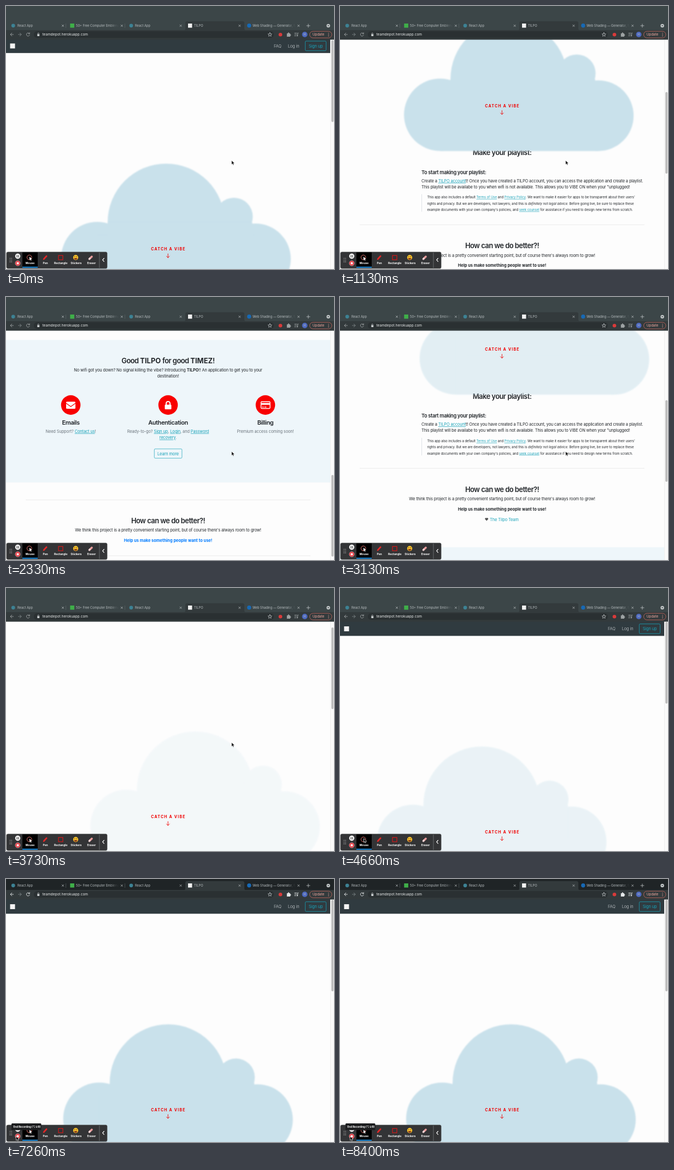
Animation of 600 by 480 pixels, one loop 8.46 s. Source, as an HTML page:

```html
<!DOCTYPE html>
<html lang="en">
<head>
<meta charset="utf-8">
<title>Page scroll</title>
<style>
html, body { margin: 0; width: 100%; height: 100%; overflow: hidden; background: #fdfdfd; }
svg { display: block; width: 600px; height: 480px; }
text { font: 7.4px Inter, "Liberation Sans", sans-serif; letter-spacing: -.013em; fill: #212529; white-space: pre; }
.mid { text-anchor: middle; }
.h3 { font-size: 12.9px; font-weight: 600; letter-spacing: -.04em; }
.h4 { font-size: 11px; font-weight: 600; letter-spacing: -.038em; }
.h5 { font-size: 9.2px; font-weight: 600; letter-spacing: -.036em; }
.small { font-size: 5.95px; letter-spacing: -.002em; }
.grey { fill: #6c757d; }
.b { font-weight: 700; letter-spacing: .002em; }
.i { font-style: italic; }
.link, .teal { fill: #17a2b8; }
.link { text-decoration: underline; }
.blue { fill: #007bff; }
.nav { fill: #a9afb2; }
.catch { font-size: 7px; font-weight: 700; letter-spacing: 1.2px; fill: #f00000; }
.tab { font-size: 5.75px; letter-spacing: 0; fill: #b9bfc1; }
.url { font-size: 6.4px; letter-spacing: .013em; fill: #eceeee; }
.update { font-size: 6.4px; fill: #eda89f; }
.tool { font-size: 5px; font-weight: 700; letter-spacing: 0; fill: #fff; }
.tip { font-size: 4.6px; }
.line { fill: none; stroke-linecap: round; stroke-linejoin: round; }
</style>
</head>
<body>
<svg id="stage" viewBox="0 0 600 480"></svg>
<script>
const LOOP = 8460, MID = 296.5;
const $ = id => document.getElementById(id);

const text = (x, y, cls, s) => `<text x="${x}" y="${y}" class="${cls}">${s}</text>`;
const span = (cls, s) => `<tspan class="${cls}">${s}</tspan>`;
const link = s => span('link', s);
const rect = (x, y, w, h, fill, more = '') =>
  `<rect x="${x}" y="${y}" width="${w}" height="${h}" fill="${fill}" ${more}/>`;
const dot = (x, y, r, fill, more = '') => `<circle cx="${x}" cy="${y}" r="${r}" fill="${fill}" ${more}/>`;
const line = (d, color, w = 1) => `<path class="line" d="${d}" stroke="${color}" stroke-width="${w}"/>`;
const shape = (d, fill) => `<path d="${d}" fill="${fill}"/>`;
const rule = y => rect(36, y, 521, .7, '#e2e2e2');

// Web page, laid out as seen before scrolling.
const cloud = `<g id="cloud" fill="#c9e1eb" filter="url(#soft)">
  <circle cx="192" cy="396.3" r="107"/><circle cx="316" cy="386" r="34.5"/>
  <circle cx="66" cy="461.5" r="66"/><circle cx="355.5" cy="463.2" r="64.5"/>
  <rect x="66" y="420" width="289" height="107.7"/><rect x="85.5" y="396" width="264" height="60"/></g>`;

const better = (y, cls) =>
  text(MID, y, 'mid h3', 'How can we do better?!') +
  text(MID, y + 15.2, 'mid', "We think this project is a pretty convenient starting point, but of course there's always room to grow!") +
  text(MID, y + 34, 'mid b ' + cls, 'Help us make something people want to use!');

const intro =
  text(MID, 535.5, 'mid h3', 'Make your playlist:') +
  text(149, 569.7, 'h5', 'To start making your playlist:') +
  text(149, 584.7, '', `Create a ${link('TILPO account')}t! Once you have created a TILPO account, you can access the application and create a playlist.`) +
  text(149, 595.7, '', 'This playlist will be availabe to you when wifi is not available. This allows you to VIBE ON when your "unplugged!') +
  rect(149, 606.5, 1, 32, '#dee2e6') +
  text(159.5, 614.4, 'small', `This app also includes a default ${link('Terms of Use')} and ${link('Privacy Policy')}. We want to make it easier for apps to be transparent about their users'`) +
  text(159.5, 625.7, 'small', `rights and privacy. But we are developers, not lawyers; and this is ${span('i', 'definitely not legal advice')}. Before going live, be sure to replace these`) +
  text(159.5, 636.9, 'small', `example documents with your own company's policies, and ${link('seek counsel')} for assistance if you need to design new terms from scratch.`) +
  rule(661.8) + better(705.5, '') +
  shape('M268.2 758l-2.6-2.8a1.6 1.6 0 0 1 2.6-2.1a1.6 1.6 0 0 1 2.6 2.1z', '#555') +
  text(274, 758, 'teal', 'The Tilpo Team');

const features =
  rect(0, 806, 593, 260, '#eef6fa') +
  text(MID, 848.3, 'mid h3', `Good ${span('b', 'TILPO')} for good ${span('b', 'TIMEZ')}!`) +
  text(MID, 863.4, 'mid', `No wifi got you down? No signal killing the vibe? Introducing ${span('b', 'TILPO')}!! An application to get you to your`) +
  text(MID, 874.4, 'mid', 'destination!') +
  [118.5, MID, 474.5].map((x, i) => dot(x, 924.6, 17.8, '#f80000') +
    text(x, 960.7, 'mid h4', ['Emails', 'Authentication', 'Billing'][i])).join('') +
  rect(110, 918.5, 17, 13, '#fff', 'rx="1.6"') + line('M110 921.5l8.5 6l8.5 -6', '#f80000', 1.3) +
  rect(290.5, 924, 12, 8.5, '#fff', 'rx="1.2"') + line('M293 924v-2.3a3.5 3.5 0 0 1 7 0v2.3', '#fff', 2) +
  rect(466.5, 918.5, 16.5, 12.5, 'none', 'rx="1.4" stroke="#fff" stroke-width="1.4"') +
  rect(466.5, 921, 16.5, 3.2, '#fff') + line('M469 928.3h2M473 928.3h3', '#fff', 1.2) +
  text(118.5, 975.3, 'mid grey', `Need Support? ${link('Contact us')}!`) +
  text(MID, 975.3, 'mid grey', `Ready-to-go? ${link('Sign up')}, ${link('Login')}, and ${link('Password')}`) +
  text(MID, 986.9, 'mid grey', `${link('recovery')}.`) +
  text(474.5, 975.3, 'mid grey', 'Premium access coming soon!') +
  rect(271.3, 1004.7, 50.6, 17, 'none', 'rx="1.8" stroke="#17a2b8" stroke-width=".7"') +
  text(MID, 1016, 'mid teal', 'Learn more');

const header =
  rect(0, 61, 593, 26.4, '#303b40') + rect(7.5, 70, 9, 9, '#f4f4f4') +
  text(490, 77.2, 'nav', 'FAQ') + text(515.7, 77.2, 'nav', 'Log in') +
  rect(547.4, 65.6, 38.2, 17.6, 'none', 'rx="1.8" stroke="#17a2b8" stroke-width=".8"') +
  text(566.5, 77.2, 'mid teal', 'Sign up');

const page = header + intro + cloud +
  text(MID + .5, 447.7, 'mid catch', 'CATCH A VIBE') +
  line('M296.3 453.8v7M293.5 458.2l2.8 2.8l2.8 -2.8', '#f00000', .9) +
  features + rule(1097.3) + better(1140.3, 'blue') + rule(1199.3);

// Browser frame; currentColor is the tab strip.
const cross = x => line(`M${x - 1.6} 10.4l3.2 3.2m0 -3.2l-3.2 3.2`, '#c3c8c9', .7);
const arrow = (x, dir) => `M${x - 2.7} 28h5.4M${x} 25.2l${2.8 * dir} 2.8l${-2.8 * dir} 2.8`;
const tabs = [[21, 'React App'], [128, '50+ Free Computer Emblem'], [236, 'React App'], [344, 'TILPO'], [451, 'Web Shading — Generator, M']];

const browser =
  rect(0, -24, 600, 45, 'currentColor') + rect(0, 20, 600, 17.5, '#333a3c') +
  shape('M325 20.2q3 0 3 -3v-10q0 -3.5 3.5 -3.5h101q3.5 0 3.5 3.5v10q0 3 3 3z', '#333a3c') +
  tabs.map(([x, s], i) => text(x, 14, 'tab', s) + cross(104 + i * 107.8)).join('') +
  rect(190, 7, 14, 10, 'url(#fade)') + rect(514, 7, 15, 10, 'url(#fade)') + rect(529, 7, 4, 10, 'currentColor') +
  [109, 217].map(x => rect(x, 8, .5, 8, '#667072')).join('') +
  dot(13.2, 11.8, 3.4, '#3d8294') + dot(229, 11.8, 3.4, '#3d8294') +
  rect(117.3, 8, 7.6, 7.6, '#3fae49') + rect(333, 8, 7.4, 7.6, '#f1f1f1') + dot(444.8, 11.8, 3.7, '#1769b5') +
  line('M550 12h6M553 9v6', '#c3c8c9', .8) +
  dot(589.6, 12, 3.2, '#c3c8c9') + shape('M588 11.2h3.2l-1.6 2z', '#333a3c') +
  rect(51, 22, 439, 12.3, '#2a3032', 'rx="6"') +
  `<g id="icons">` + line(arrow(10.8, -1), '#e4e7e8', .9) +
  line('M43 26.5a3 3 0 1 0 .2 2.6M43.2 24.6v2.2h-2.2', '#e4e7e8', .9) +
  shape('M513.8 26h2a1.2 1.2 0 1 1 2.2 0h2v2a1.1 1.1 0 1 1 0 2.1v1.9h-6.2z', '#e4e7e8') +
  line('M528 25.5h4M528 28h4M528 30.5h2M533.6 30v-4.7h1.2', '#e4e7e8', .9) + dot(532.8, 30.3, 1.1, '#e4e7e8') + '</g>' +
  line(arrow(25.3, 1), '#7e8688', .9) +
  rect(57.2, 27.3, 4, 3.6, '#c9cdce', 'rx=".4"') + line('M58 27.3v-1a1.2 1.2 0 0 1 2.4 0v1', '#c9cdce', .7) +
  text(66.5, 30.4, 'url', 'teamdepot.herokuapp.com') +
  line('M482.8 24.5l1 2.4l2.6 .2l-2 1.7l.7 2.5l-2.3 -1.4l-2.3 1.4l.7 -2.5l-2 -1.7l2.6 -.2z', '#d5d9da', .7) +
  dot(502, 28.3, 3.3, '#d93a3a') + dot(546.5, 28, 5, '#4c68c0') + text(546.5, 30, 'mid tab', 'H') +
  rect(555.5, 22.2, 40.5, 12, 'none', 'rx="6" stroke="#c9695f" stroke-width=".8"') +
  text(560.7, 30.4, 'update', 'Update') +
  [25.6, 28.2, 30.8].map(y => dot(590, y, .7, '#eda89f')).join('');

// Recording toolbar.
const tools = ['Mouse', 'Pen', 'Rectangle', 'Stickers', 'Eraser'];
const recorder =
  rect(1, 449, 184, 30, '#333436', 'rx="2.5" stroke="#4d4e50" stroke-width=".7"') +
  [460.5, 463.7, 466.9].map(y => dot(7.4, y, .8, '#aaa') + dot(10.2, y, .8, '#aaa')).join('') +
  dot(21.5, 456.6, 4.8, '#f5f5f5') + line('M20.1 454.8v3.6M22.9 454.8v3.6', '#333', 1.1) +
  dot(21.5, 469.5, 4.6, '#e5343d', 'stroke="#f2c4c6" stroke-width=".6"') + rect(19.6, 467.6, 3.8, 3.8, '#fff') +
  rect(30, 449.6, 28, 28, '#000') + rect(30, 475.8, 28, 2, '#1d8fe1') +
  tools.map((s, i) => text(44 + i * 28.1, 471.2, 'mid tool', s)).join('') +
  dot(42.7, 458.8, 4.3, 'none', 'stroke="#e8756f" stroke-width="1"') +
  shape('M43 457.5v6.4l1.5 -1.4l1 2.2l1.1 -.5l-1 -2.1h2z', '#fff') +
  line('M69.5 461.5l4.6 -5', '#e02828', 2.8) + shape('M67.6 463.8l.8 -3l2.2 2z', '#e02828') +
  rect(96, 455.3, 8, 7.8, 'none', 'stroke="#e31616" stroke-width="1.1"') +
  dot(127.5, 459, 4.7, '#f8c32c') + shape('M124.6 460h5.8a2.9 2.9 0 0 1 -5.8 0z', '#8b3a1e') +
  dot(125.8, 457.6, .8, '#5b3a16') + dot(129.2, 457.6, .8, '#5b3a16') +
  line('M153 461.2l4 -3.8', '#e69a9a', 3.6) + line('M152.4 461.7l.8 -.8', '#f3d3d3', 3.4) +
  rect(170.5, 450, .8, 28, '#77787a') + line('M179.3 460.5l-2.6 2.9l2.6 2.9', '#fff', 1.2);

$('stage').innerHTML = `<defs>
  <filter id="soft" x="-5%" y="-5%" width="110%" height="110%"><feGaussianBlur stdDeviation="1.2"/></filter>
  <linearGradient id="fade"><stop stop-color="currentColor" stop-opacity="0"/><stop offset="1" stop-color="currentColor"/></linearGradient>
  </defs>` + rect(0, 0, 600, 480, '#fdfdfd') + `<g id="page">${page}</g>` +
  rect(593, 0, 7, 480, '#fafafa') + rect(593, 0, .6, 480, '#e6e6e6') + rect(595.2, 0, 4, 149, '#bcbcbc', 'rx="2" id="thumb"') +
  `<g id="browser">${browser}</g>${recorder}` +
  `<g id="tip">${rect(10, 446, 54.5, 12.3, '#1d1e20', 'rx="1.5"')}${text(13.5, 453.9, 'tool tip', 'End Recording (⌥⇧R)')}</g>` +
  `<path id="cursor" d="M0 0v7.4l1.7 -1.6l1.2 2.6l1.3 -.6l-1.2 -2.5h2.4z" fill="#000" stroke="#fff" stroke-width=".6"/>`;

const mix = (a, b, k) => a + (b - a) * k;
const clamp = k => Math.max(0, Math.min(1, k));
const ease = k => k * k * (3 - 2 * k);

// Value at time t between [time, value] points.
function track(points, t) {
  const i = points.findIndex(p => p[0] > t);
  if (i < 0) return points[points.length - 1][1];
  if (!i) return points[0][1];
  const [t0, a] = points[i - 1], [t1, b] = points[i];
  return mix(a, b, (t - t0) / (t1 - t0));
}

const scrollPath = [[0, 1.5], [300, 25], [700, 110], [1600, 429.5], [2150, 695], [2330, 727.5], [2480, 727.5],
  [2700, 615], [3130, 350], [3500, 120], [3750, 20], [3900, 0]];
const cursorX = [[4000, 412.7], [4560, 43.5], [4900, 43.5], [5400, 20], [6500, 20], [7000, 18.5]];
const cursorY = [[4000, 282], [4560, 457], [4900, 457], [5400, 467.6], [6500, 467.6], [7000, 469.6]];
const stripIdle = [60, 70, 72], stripActive = [31, 36, 38];

function draw(now) {
  const t = now % LOOP;
  const scroll = track(scrollPath, t);
  const raised = ease(clamp((t - 6400) / 450));
  const drop = 24 * (1 - raised);
  const move = (id, x, y) => $(id).setAttribute('transform', `translate(${x} ${y})`);

  move('page', 0, drop - 24 - scroll);
  move('browser', 0, drop);
  $('icons').setAttribute('opacity', mix(.6, 1, raised));
  $('stage').style.color = `rgb(${stripIdle.map((c, i) => mix(c, stripActive[i], raised))})`;

  // The cloud drifts right, fading in and out over a quarter of its path.
  const drift = (t + 2970) / 7000 % 1;
  move('cloud', 58.5 + 100 * drift, 0);
  $('cloud').setAttribute('opacity', clamp(4 * Math.min(drift, 1 - drift)));

  const view = 442.5 - drop, full = 1159;
  $('thumb').setAttribute('y', 38 + drop + scroll * view / full);
  $('thumb').setAttribute('height', view * view / full - 2);

  move('cursor', track(cursorX, t), track(cursorY, t));
  $('tip').setAttribute('visibility', t > 7000 ? 'visible' : 'hidden');
  requestAnimationFrame(() => draw(performance.now() - start));
}
const start = performance.now();
draw(0);
</script>
</body>
</html>
```
